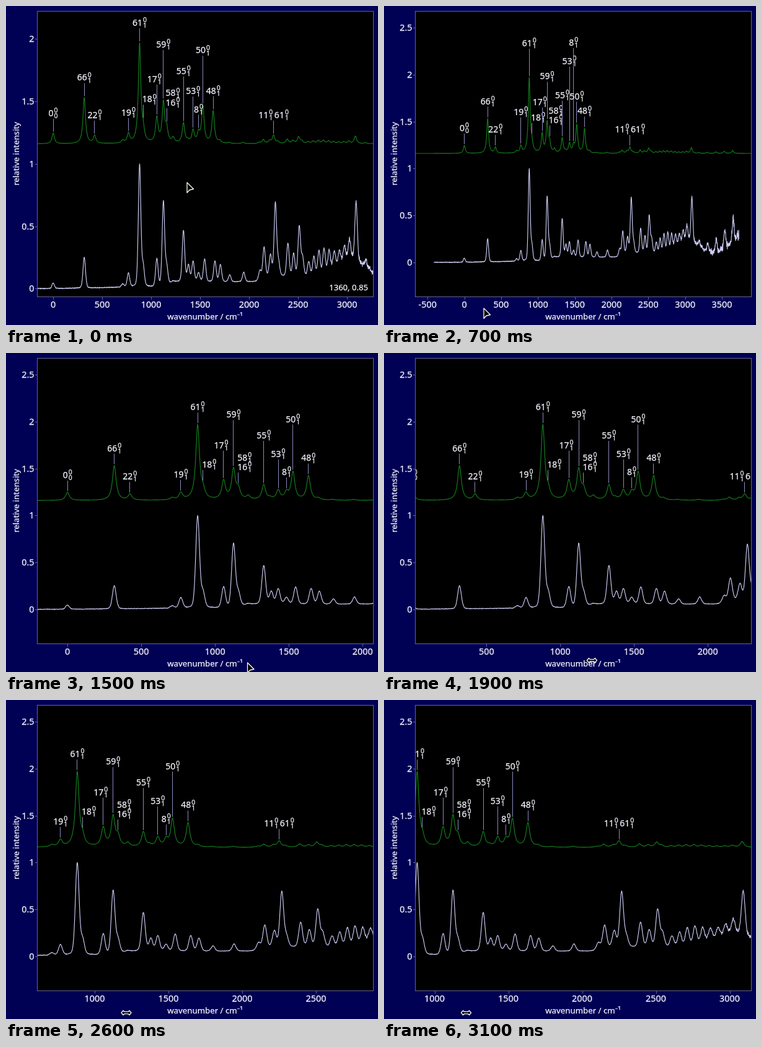
Animation of 600 by 515 pixels, one loop 3.2 s. Source, as an HTML page with a canvas:

```html
<!DOCTYPE html>
<html lang="en">
<head>
<meta charset="utf-8">
<title>Spectrum viewer</title>
<style>
html, body { margin: 0; width: 100%; height: 100%; overflow: hidden; background: #000054; }
canvas { display: block; width: 600px; height: 515px; }
</style>
</head>
<body>
<canvas id="stage" width="600" height="515"></canvas>
<script>
const ctx = document.getElementById('stage').getContext('2d');
const LOOP = 3200, STEP = 100;
const BOX = { l: 50, t: 8, r: 592, b: 469 };
const FONT = '"Noto Sans", "Open Sans", sans-serif';
const INK = '#f4f4ff';

const clamp = v => Math.max(0, Math.min(1, v));
const mix = (a, b, u) => a + (b - a) * u;

// Linear path through [time, value] points
function along(points, t) {
  let i = 1;
  while (i < points.length - 1 && t > points[i][0]) i++;
  const [ta, a] = points[i - 1], [tb, b] = points[i];
  return mix(a, b, clamp((t - ta) / (tb - ta)));
}

// ---- spectra ----
// Bands seen in both curves: g and w are heights in the green and white one,
// lift is the label height above the peak, tight the lift when zoomed out.
const bands = [
  { at: 0, name: '0', g: .085, w: .045 },
  { at: 317, name: '66', g: .37, w: .245 },
  { at: 423, name: '22', g: .063, w: 0 },
  { at: 710, g: .022, w: .025 },
  { at: 768, name: '19', g: .075, w: .11, tight: 53 },
  { at: 882, name: '61', g: .795, w: .98, tight: 55 },
  { at: 918, name: '18', g: .075, w: .16, lean: 10 },
  { at: 1058, name: '17', g: .2, w: .22, lift: 55, tight: 49, lean: -4 },
  { at: 1125, name: '59', g: .32, w: .675, lift: 85, tight: 71 },
  { at: 1158, name: '16|58', g: .105, w: .145, lean: 10 },
  { at: 1225, g: .04, w: .01 },
  { at: 1330, name: '55', g: .16, w: .41, lift: 79, tight: 68 },
  { at: 1428, name: '53', g: .1, w: .16, lift: 57, tight: 131 },
  { at: 1484, name: '8', g: .075, w: .07, tight: 161 },
  { at: 1528, name: '50', g: .295, w: .18, lift: 84, tight: 45 },
  { at: 1633, name: '48', g: .258, w: .165 },
  { at: 2250, name: '11 61', g: .065, w: .59 }
];
// Further [position, height] bands of the white curve, faint in the green one
const weak = [
  [1381, .13], [1707, .135], [1802, .055], [1945, .075], [2110, .07], [2153, .24],
  [2218, .17], [2300, .11], [2396, .265], [2455, .18], [2512, .4], [2545, .15], [3092, .47]
];
for (let k = 0; k < 9; k++) weak.push([2609 + 52 * k, .15 + .05 * Math.sin(k * .9 - .8)]);
for (let k = 0; k < 5; k++) weak.push([3193 + 115 * k, .06 * Math.pow(1.42, k)]);

const lorentz = u => 1 / (1 + u * u);
const bell = u => Math.pow(2, -u * u);
const rise = u => 1 / (1 + Math.exp(-u));
const sum = (list, f) => list.reduce((s, item) => s + f(item), 0);

function green(x) {
  return 1.16 + sum(bands, b => b.g * lorentz((x - b.at) / 15)) +
    sum(weak, ([p, h]) => .13 * h * lorentz((x - p + 7) / 15));
}

let seed = 7;
function rand() {
  seed = (seed * 16807) % 2147483647;
  return seed / 2147483647;
}

function white(x) {
  const peak = (p, h) => {
    const u = (x - p) / 15;
    return h * (.8 * bell(u) + .2 * lorentz(u));
  };
  const floor = .012 * clamp(x / 800) + .042 * rise((x - 1180) / 30) +
    .04 * rise((x - 2115) / 20) + .14 * bell((x - 3030) / 170) +
    .2 * Math.pow(Math.max(0, x - 3300) / 430, 2);
  const far = Math.max(0, x - 2300) / 1200;
  const noise = (rand() + rand() - 1) * (.004 + .045 * far * far);
  return floor + noise + sum(bands, b => peak(b.at + (b.at > 1500 ? 18 : 0), b.w)) +
    sum(weak, ([p, h]) => peak(p, h));
}

function sample(f, a, b) {
  const pts = [];
  for (let x = a; x <= b; x += 2) pts.push([x, f(x)]);
  return pts;
}
const greenLine = sample(green, -800, 4400);
const whiteLine = sample(white, -412, 3730);

// ---- view and pointer over time ----
// Wheel zoom about the pointer, zoom along x on the axis, then a drag of the axis
const xScale = [[0, .158], [500, .1187], [800, .1187], [1100, .1836], [1300, .238]];
const drag = [[1600, 99], [1900, 46.3], [2300, -31], [2600, -95], [3100, -156.5]];

function viewAt(t) {
  const sx = along(xScale, t);
  const sy = along([[0, 201.5], [500, 151.5]], t);
  const y0 = 285 + .85 * sy;
  let x0 = 291 - 1360 * sx;
  if (t >= 800) x0 = 160 - 255.5 * sx;
  if (t >= 1600) x0 = along(drag, t);
  return { sx, sy, x0, y0, px: v => x0 + v * sx, py: v => y0 - v * sy };
}

function pointerAt(t, view) {
  if (t >= 1600) return [view.x0 + 289, along([[1600, 492], [2300, 502], [2600, 505]], t)];
  return [
    along([[500, 291.5], [700, 160.5], [1300, 160.5], [1500, 389]], t),
    along([[500, 285], [700, 488], [1300, 488], [1500, 500]], t)
  ];
}

// ---- drawing ----
function text(s, x, y, size, align = 'center') {
  ctx.font = size + 'px ' + FONT;
  ctx.textAlign = align;
  ctx.fillStyle = ctx.strokeStyle = INK;
  ctx.lineWidth = .25;
  ctx.fillText(s, x, y + size * .357);
  ctx.strokeText(s, x, y + size * .357);
}

function segment(x1, y1, x2, y2, color) {
  ctx.strokeStyle = color;
  ctx.lineWidth = 1;
  ctx.beginPath();
  ctx.moveTo(x1, y1);
  ctx.lineTo(x2, y2);
  ctx.stroke();
}

function curve(pts, view, color) {
  ctx.beginPath();
  for (const [x, y] of pts) {
    const p = view.px(x);
    if (p > 30 && p < 620) ctx.lineTo(p, view.py(y));
  }
  ctx.strokeStyle = color;
  ctx.lineWidth = 1.15;
  ctx.lineJoin = 'round';
  ctx.stroke();
}

// A row of numbers, each with a small upper and lower index
const SCRIPT = 7, GAP = 2.5;
function rowWidth(row) {
  ctx.font = '14px ' + FONT;
  const parts = row.split(' ');
  return sum(parts, p => ctx.measureText(p).width + SCRIPT) + GAP * (parts.length - 1);
}

function labelRow(row, x, y) {
  for (const part of row.split(' ')) {
    text(part, x, y, 14, 'left');
    x += ctx.measureText(part).width;
    text('0', x + 4, y - 4.5, 10.5);
    text(part === '0' ? '0' : '1', x + 4, y + 4.5, 10.5);
    x += SCRIPT + GAP;
  }
}

function drawLabels(view) {
  const crowd = clamp((.158 - view.sx) / .039);
  const extra = clamp((view.sy - 151.5) / 50) * 4;
  for (const { at, name, lift = 28, tight = lift, lean = 0 } of bands) {
    if (!name) continue;
    const x = view.px(at), top = view.py(green(at));
    const y = top - mix(lift, tight, crowd) - extra;
    const rows = name.split('|');
    const left = x + lean - rowWidth(rows[0]) / 2;
    const lineX = Math.floor(x) + .5;
    segment(lineX, y + 9, lineX, top - 2, '#8a8ac0');
    rows.forEach((row, n) => labelRow(row, left, y - n * 15.5));
  }
}

function drawAxes(view) {
  const color = '#6464a4';
  ctx.strokeStyle = color;
  ctx.lineWidth = 1;
  ctx.strokeRect(BOX.l + .5, BOX.t + .5, BOX.r - BOX.l, BOX.b - BOX.t);
  for (let v = -500; v <= 4000; v += 500) {
    const x = view.px(v), mark = Math.round(x) + .5;
    if (x < BOX.l || x > BOX.r) continue;
    segment(mark, 470, mark, 474, color);
    text(String(v), x, 482, 14.4);
  }
  for (let v = 0; v <= 3; v += .5) {
    const y = view.py(v), mark = Math.round(y) + .5;
    if (y < BOX.t || y > BOX.b) continue;
    segment(47, mark, 50, mark, color);
    text(String(v), 45.5, y, 14.4, 'right');
  }
  text('wavenumber / cm⁻¹', 321, 501, 13.25);
  ctx.save();
  ctx.translate(16, 238.5);
  ctx.rotate(-Math.PI / 2);
  text('relative intensity', 0, 0, 13.25);
  ctx.restore();
}

function drawReadout(view, cx, cy) {
  const x = Math.round((cx - .5 - view.x0) / view.sx);
  const y = ((view.y0 - cy) / view.sy).toFixed(2);
  text(x + ', ' + y, 584, 454.5, 13.1, 'right');
}

const ARROW = new Path2D('M.5 0V16.5L4.5 12L11 10.5Z');
const RESIZE = new Path2D('M-8 0L-5-3.5L-3-1.7H3L5-3.5L8 0L5 3.5L3 1.7H-3L-5 3.5Z');

function drawPointer(shape, x, y) {
  ctx.save();
  ctx.translate(x, y);
  ctx.fillStyle = '#000';
  ctx.strokeStyle = '#fffff0';
  ctx.lineWidth = 1.3;
  ctx.lineJoin = 'round';
  ctx.fill(shape);
  ctx.stroke(shape);
  ctx.restore();
}

function draw(t) {
  const view = viewAt(t);
  const [cx, cy] = pointerAt(t, view);
  ctx.fillStyle = '#000054';
  ctx.fillRect(0, 0, 600, 515);
  ctx.fillStyle = '#000';
  ctx.fillRect(BOX.l, BOX.t, BOX.r - BOX.l, BOX.b - BOX.t);

  ctx.save();
  ctx.beginPath();
  ctx.rect(BOX.l + 1, BOX.t + 1, BOX.r - BOX.l - 1, BOX.b - BOX.t - 1);
  ctx.clip();
  curve(greenLine, view, '#14801c');
  curve(whiteLine, view, '#ccccf6');
  drawLabels(view);
  if (cy < BOX.b) drawReadout(view, cx, cy);
  ctx.restore();

  drawAxes(view);
  drawPointer(t < 1600 ? ARROW : RESIZE, cx, cy);
}

const start = performance.now();
function tick() {
  const t = Math.max(0, performance.now() - start) % LOOP;
  draw(Math.floor(t / STEP) * STEP);
  requestAnimationFrame(tick);
}
tick();
</script>
</body>
</html>
```
